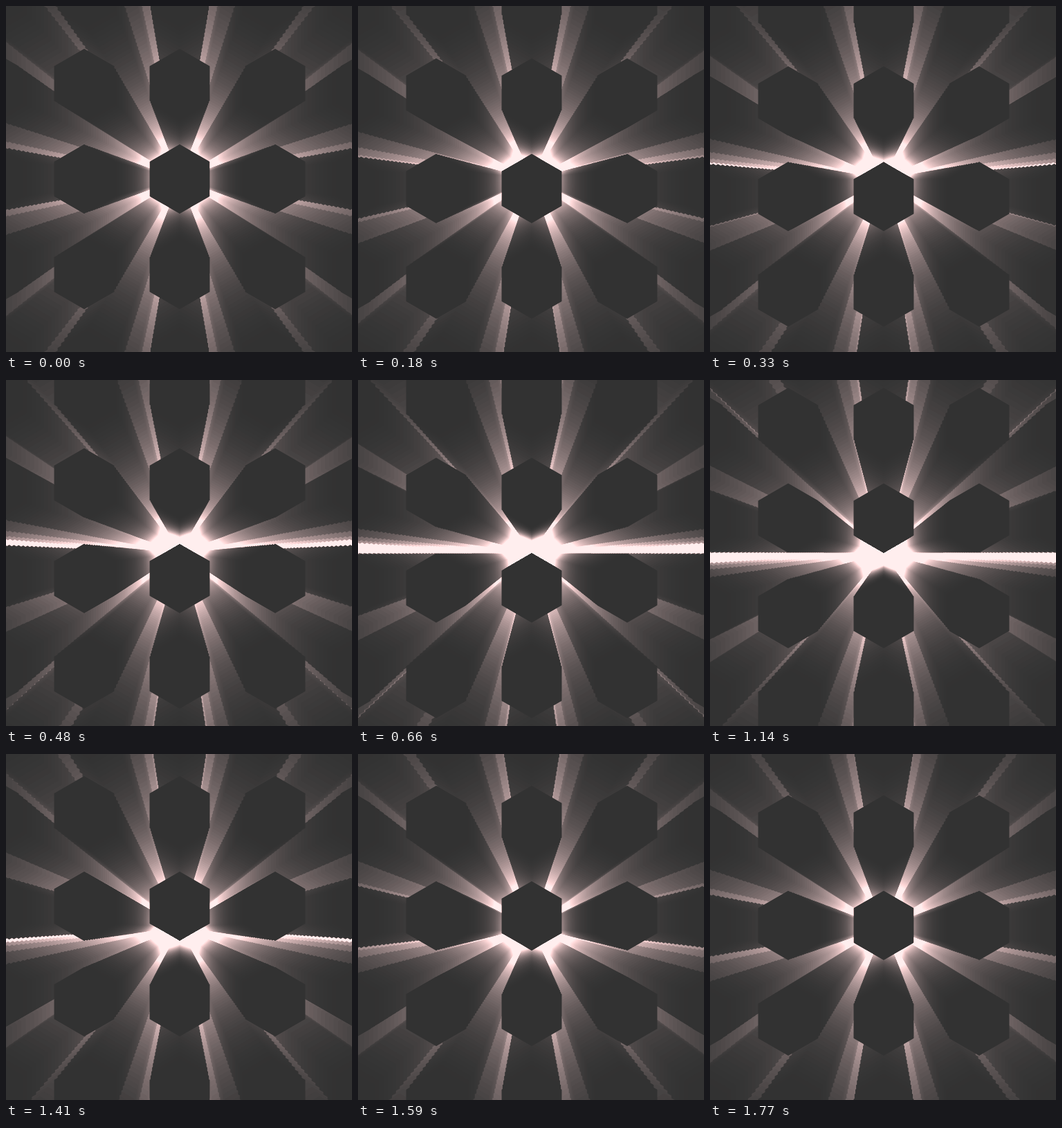
Write an HTML page with a canvas that moves like this. It is 500 by 500 pixels and loops after 1.8 s.

```html
<!DOCTYPE html>
<html>
<head>
<meta charset="utf-8">
<title>Hexagon light rays</title>
<style>
html, body { margin: 0; width: 100%; height: 100%; overflow: hidden; background: #323232; }
canvas { display: block; width: 500px; height: 500px; }
</style>
</head>
<body>
<canvas id="stage" width="500" height="500"></canvas>
<script>
const SIZE = 500, CX = 251, CY = 250;
const GAP = 138, R = 50, HALF = R * Math.sqrt(3) / 2;
const LOOP = 1800, STEP = 30;
const LAYERS = 54, SHRINK = 0.972, BASE = 50;

const ctx = document.getElementById('stage').getContext('2d', { willReadFrequently: true });

// Depth 0..255 to light: dark in front, bright far away
const light = new Float32Array(256);
for (let i = 0; i < 256; i++) light[i] = Math.pow(i / 255, 1.8);

// Extra glow around the vanishing point
const glow = new Float32Array(SIZE * SIZE);
for (let y = 0; y < SIZE; y++) {
  for (let x = 0; x < SIZE; x++) {
    const r = Math.hypot(x + 0.5 - CX, y + 0.5 - CY);
    glow[y * SIZE + x] = 1 + 3.5 * Math.exp(-r * r / 1024);
  }
}

function addHex(x, y, s) {
  const w = HALF * s, h = R * s;
  ctx.moveTo(x, y - h);
  ctx.lineTo(x + w, y - h / 2);
  ctx.lineTo(x + w, y + h / 2);
  ctx.lineTo(x, y + h);
  ctx.lineTo(x - w, y + h / 2);
  ctx.lineTo(x - w, y - h / 2);
  ctx.closePath();
}

function drawLayer(i, shift) {
  const s = Math.pow(SHRINK, i), v = Math.round(255 * i / LAYERS);
  ctx.fillStyle = `rgb(${v},${v},${v})`;
  ctx.beginPath();
  for (let row = -6; row <= 5; row++) {
    const y = CY + (row * GAP + shift) * s;
    if (y < -R || y > SIZE + R) continue;
    for (let col = -5; col <= 5; col++) {
      const x = CX + col * GAP * s;
      if (x > -R && x < SIZE + R) addHex(x, y, s);
    }
  }
  ctx.fill();
}

function draw(shift) {
  ctx.fillStyle = '#fff';
  ctx.fillRect(0, 0, SIZE, SIZE);
  for (let i = LAYERS - 1; i >= 0; i--) drawLayer(i, shift);

  const img = ctx.getImageData(0, 0, SIZE, SIZE), d = img.data;
  for (let p = 0, i = 0; i < d.length; p++, i += 4) {
    const l = light[d[i]] * glow[p];
    d[i] = Math.min(255, BASE + 232 * l);
    d[i + 1] = d[i + 2] = Math.min(238, BASE + 188 * l);
  }
  ctx.putImageData(img, 0, 0);
}

const start = performance.now();
let last = -1;

function tick() {
  const t = Math.max(0, performance.now() - start) % LOOP;
  const step = Math.floor(t / STEP);
  if (step !== last) {
    last = step;
    draw(GAP * step * STEP / LOOP);
  }
  requestAnimationFrame(tick);
}
tick();
</script>
</body>
</html>
```
